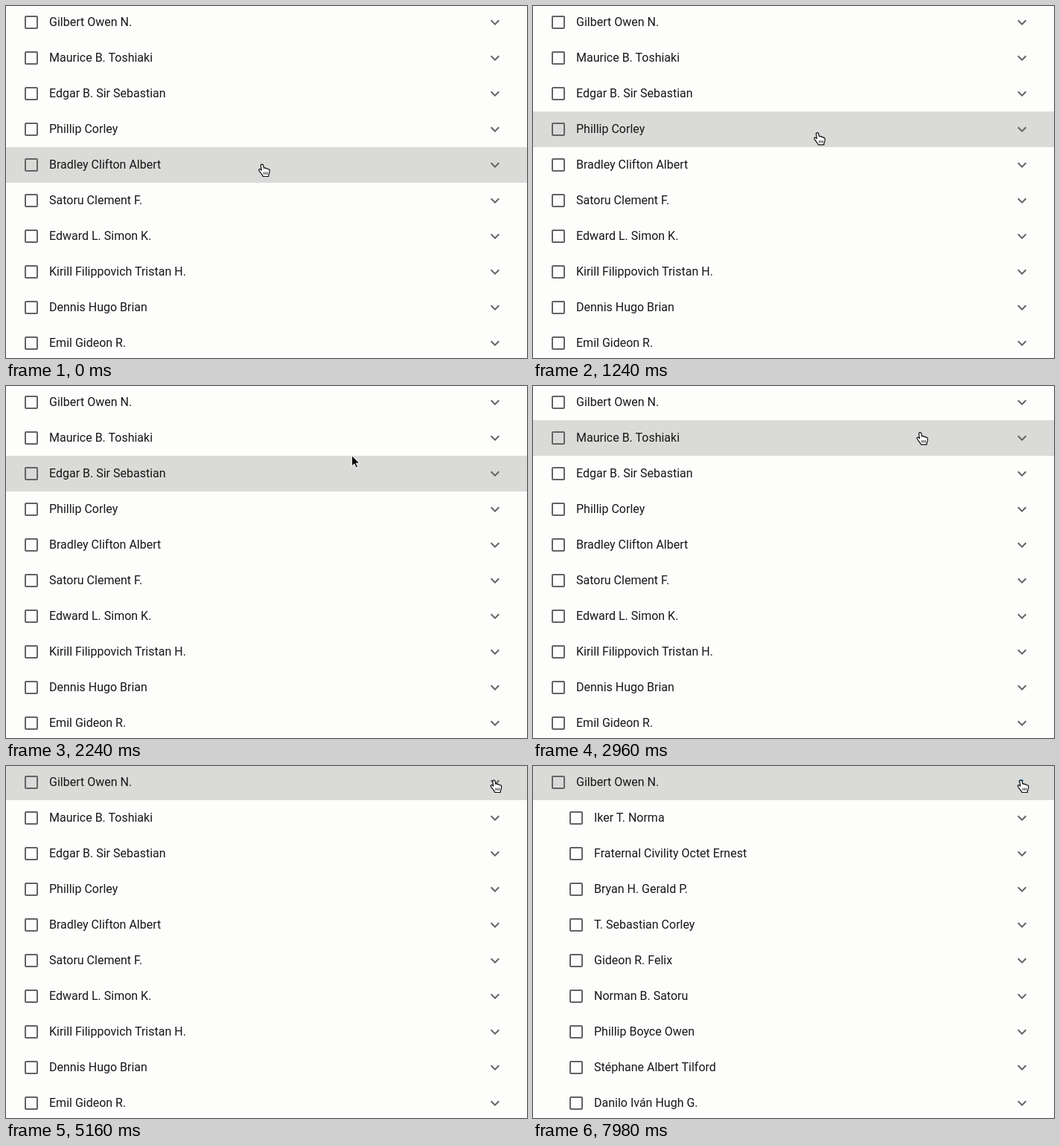
Write an HTML page that moves like this. It is 700 px wide and 474 px high and loops after 8 s.

```html
<!DOCTYPE html>
<html lang="en">
<head>
<meta charset="utf-8">
<title>Tree list</title>
<style>
  html, body { margin: 0; width: 100%; height: 100%; overflow: hidden; background: #fdfdfc; }
  svg { display: block; width: 700px; height: 474px; }
  text { font: 16px Roboto, sans-serif; fill: #171717; }
  .box { fill: none; stroke: #636363; stroke-width: 2; }
  .chevron { fill: #636363; }
  .hover { fill: #dadad8; }
  .hand { fill: #fff; stroke: #0a0a0a; stroke-width: 1.2; stroke-linejoin: round; }
  .arrow { fill: #0a0a0a; stroke: #fff; stroke-width: 1; }
</style>
</head>
<body>
<svg viewBox="0 0 700 474">
  <g id="hovers"></g>
  <g id="first"></g>
  <g id="closed"></g>
  <g id="open"></g>
  <path id="active" d="M652.5 21.5Q655 17.5 659 20" fill="none" stroke="#4a93b4" stroke-width="2"/>
  <g id="cursor">
    <g id="hand" class="hand">
      <path d="M-2.2 1.8C-2.2-.3 .9-.3 1.2 1.6L2 5.3C2.6 4.6 4.4 4.7 4.8 6C5.6 5.4 7 5.7 7.4 6.9C8.6 6.4 9.6 7.2 9.7 8.4C9.9 11 9.3 12.6 8.5 14.2L8.3 16.5H.8C.2 14.2-1.8 12.7-3.6 10C-4.6 8.5-5.2 7.8-4.6 7.1C-3.8 6.2-2.4 6.8-1.2 8.2Z"/>
      <path d="M2.2 10.5V14M4.4 10.5V14M6.6 10.5V14" stroke-width=".9"/>
    </g>
    <path id="arrow" class="arrow" d="M0 0V14.5L3.4 11.4L5.8 16.6L8.2 15.5L5.9 10.6H10.4Z"/>
  </g>
</svg>
<script>
const LOOP = 8000, ROW = 48, TOP = -2, FADE = 200, PRESS = 7840, EXPAND = 7880;

const parents = ["Gilbert Owen N.", "Maurice B. Toshiaki", "Edgar B. Sir Sebastian",
  "Phillip Corley", "Bradley Clifton Albert", "Satoru Clement F.", "Edward L. Simon K.",
  "Kirill Filippovich Tristan H.", "Dennis Hugo Brian", "Emil Gideon R."];
const children = ["Iker T. Norma", "Fraternal Civility Octet Ernest", "Bryan H. Gerald P.",
  "T. Sebastian Corley", "Gideon R. Felix", "Norman B. Satoru", "Phillip Boyce Owen",
  "Stéphane Albert Tilford", "Danilo Iván Hugh G."];

// Pointer path: time, x, y, x speed, y speed (px per ms)
const path = [
  [300, 344.5, 213, 0, 0],
  [1240, 382.5, 170.5, .066, -.066],
  [2240, 464.5, 93.5, .081, -.058],
  [2960, 520.5, 62.5, .08, -.038],
  [3800, 588.5, 35, .073, -.025],
  [5160, 656, 19, 0, 0]
];

const $ = id => document.getElementById(id);
const clamp = v => Math.min(1, Math.max(0, v));
const ease = v => 1 - (1 - clamp(v)) ** 3;
const show = (el, on) => el.setAttribute("visibility", on ? "visible" : "hidden");

function row(name, i, indent = 0) {
  const y = TOP + ROW * i;
  return `<rect class="box" x="${26 + indent}" y="${y + 16}" width="16" height="16" rx="1"/>
    <text x="${58 + indent}" y="${y + 29}">${name}</text>
    <path class="chevron" transform="translate(645 ${y + 12})"
      d="M7.41 8.59L12 13.17L16.59 8.59L18 10L12 16L6 10Z"/>`;
}

$("first").innerHTML = row(parents[0], 0);
$("closed").innerHTML = parents.slice(1).map((n, i) => row(n, i + 1)).join("");
$("open").innerHTML = children.map((n, i) => row(n, i + 1, 24)).join("");
$("hovers").innerHTML = parents.slice(0, 5).map((_, i) =>
  `<rect class="hover" y="${TOP + ROW * i}" width="700" height="${ROW}"/>`).join("");
const hovers = [...$("hovers").children];
const chevron = $("first").querySelector(".chevron");

function pointer(t) {
  t = Math.min(Math.max(t, path[0][0]), path[path.length - 1][0]);
  const k = Math.max(1, path.findIndex(p => p[0] >= t));
  const a = path[k - 1], b = path[k], h = b[0] - a[0], s = (t - a[0]) / h;
  const along = c => {
    const s2 = s * s, s3 = s2 * s;
    return a[c] + (b[c] - a[c]) * (3 * s2 - 2 * s3)
      + h * (a[c + 2] * (s3 - 2 * s2 + s) + b[c + 2] * (s3 - s2));
  };
  return [along(1), along(2)];
}

// Moment the pointer enters each row from below
const enter = hovers.map((_, i) => {
  if (i === hovers.length - 1) return -FADE;
  let t = 300;
  while (pointer(t)[1] > TOP + ROW * (i + 1) - 1) t += 5;
  return t;
});

function draw(t) {
  const [x, y] = pointer(t);
  const gap = Math.abs(y - TOP - ROW * Math.round((y - TOP) / ROW));
  const between = gap < 1;
  $("cursor").setAttribute("transform", `translate(${x} ${y})`);
  show($("hand"), !between);
  show($("arrow"), between);
  hovers.forEach((el, i) => {
    const leave = i ? ease((t - enter[i - 1]) / FADE) : 0;
    el.setAttribute("opacity", ease((t - enter[i]) / FADE) * (1 - leave));
  });
  show($("closed"), t < EXPAND);
  show($("open"), t >= EXPAND);
  show(chevron, t < PRESS);
  show($("active"), t >= PRESS);
}

const start = performance.now();
function tick() {
  draw((performance.now() - start) % LOOP);
  requestAnimationFrame(tick);
}
tick();
</script>
</body>
</html>
```
